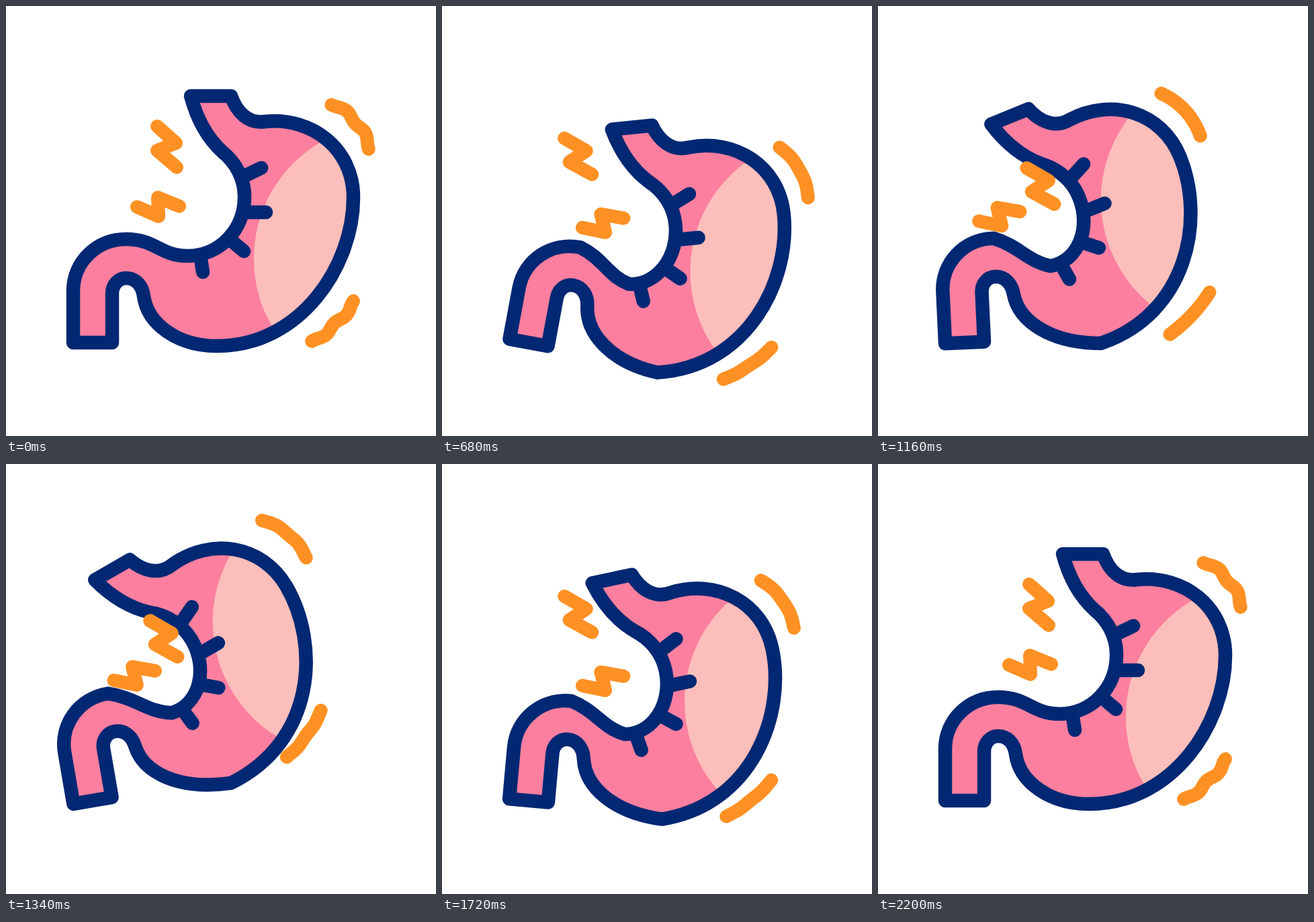
These frames come from a looping animation (640x640 px, 2.4 s). An HTML page:

```html
<!DOCTYPE html>
<html lang="en">
<head>
<meta charset="utf-8">
<title>Stomach ache</title>
<style>
  html, body { margin: 0; width: 100%; height: 100%; overflow: hidden; background: #fff; }
  svg { display: block; width: 100vw; height: 100vh; }
  .line { fill: none; stroke: #022873; stroke-width: 20.5; stroke-linecap: round; stroke-linejoin: round; }
  .pain { stroke: #ff9124; stroke-width: 20; }
</style>
</head>
<body>
<svg viewBox="0 0 640 640">
  <clipPath id="inside"><path id="mask"/></clipPath>
  <path id="fill" fill="#fc7f9f"/>
  <path id="light" fill="#fcbeba" clip-path="url(#inside)"/>
  <path id="wall" class="line"/>
  <path id="folds" class="line"/>
  <path id="waves" class="line pain"/>
  <path id="bolts" class="line pain"/>
</svg>
<script>
const LOOP = 2400, START = 200, END = 2200;

// The drawing at rest.
const BODY = `M275 134 L335 134 C343 157 360 176 386 172 C456 165 517 213 517 285
  C517 385 440 506 314 506 C256 506 211 474 205 432 C203 416 193 405 179 405
  C167 405 158 415 158 428 L158 501 L100 501 L100 424 C100 381 135 347 179 347
  C222 347 230 372 270 372 C318 372 355 333 355 284 C355 257 342 233 322 217
  C298 195 284 168 275 134Z`;
const FOLDS = 'M355 253L380 241 M357 307L387 307 M334 348L354 365 M289 371L293 396';
const LIGHT = 'M476 198 C360 262 343 400 402 486 L650 486 L650 198Z';

const BOLTS = [
  { at: [225, 179], zig: 'M0 0L28 25L0 36L29 61', out: [-43, 18], back: [40, 45] },
  { at: [195, 299], zig: 'M0 0L32 14L31 -14L63 -1', out: [14, 31], back: [-60, -10] }];
const WAVES = [
  { at: [512, 180], angle: 50, bow: 9, push: -15 },
  { at: [486, 469], angle: 136, bow: 4, push: 24 }];

// The leg swings about the foot; the belly turns about its own pivot, which travels.
const FOOT = [129, 501], PIVOT = [387, 307];
const KEYS = [
  { t: START, leg: 0, turn: 0, x: 387, y: 307 },
  { t: 800, leg: 11.7, turn: -6.4, x: 381, y: 349 },
  { t: 1400, leg: -10.4, turn: -30.7, x: 314, y: 264 },
  { t: 1870, leg: 10, turn: -6, x: 386, y: 342 },
  { t: END, leg: 0, turn: 0, x: 387, y: 307 }];

const ramp = (v, a, b) => {
  const u = Math.min(1, Math.max(0, (v - a) / (b - a)));
  return u * u * (3 - 2 * u);
};
const mix = (a, b, u) => a + (b - a) * u;

function poseAt(t) {
  const i = Math.max(1, KEYS.findIndex(k => k.t >= t));
  const [a, b] = [KEYS[i - 1], KEYS[i]];
  const u = ramp(t, a.t, b.t);
  return Object.fromEntries(Object.keys(a).map(n => [n, mix(a[n], b[n], u)]));
}

// Turns a point about one place and sets it down at another.
function spin([x, y], deg, [cx, cy] = [0, 0], [tx, ty] = [cx, cy]) {
  const r = deg * Math.PI / 180, c = Math.cos(r), s = Math.sin(r);
  x -= cx; y -= cy;
  return [tx + x * c - y * s, ty + x * s + y * c];
}

const warp = (path, move) => path.replace(/(-?\d+) (-?\d+)/g,
  (_, x, y) => move([+x, +y]).map(v => v.toFixed(2)).join(' '));

const set = (id, d) => document.getElementById(id).setAttribute('d', d);

function wave({ at, angle, bow, push }, pulse, ripple, move) {
  const points = [];
  for (let k = -1; k <= 1.001; k += 1 / 12) {
    const lift = push * pulse + bow * (1 - k * k) + ripple * Math.sin(Math.PI * k) ** 2;
    points.push(move(spin([43 * k, -lift], angle, [0, 0], at)).map(v => v.toFixed(2)).join(' '));
  }
  return 'M' + points.join('L');
}

function draw(time) {
  const t = Math.min(END, Math.max(START, time));
  const pose = poseAt(t);
  const out = ramp(t, START, 700) - ramp(t, 1700, END);
  const back = ramp(t, 700, 1200) - ramp(t, 1200, 1700);
  const pulse = (1 - Math.cos(2 * Math.PI * (t - START) / 400)) / 2;

  // Skin the outline: leg on the lower left, belly on the right, a soft blend between.
  const leg = p => spin(p, pose.leg, FOOT);
  const skin = p => {
    const belly = spin(p, pose.turn, PIVOT, [pose.x, pose.y]);
    const share = ramp(p[0] - .4 * p[1], 30, 180);
    return leg(p).map((v, i) => mix(v, belly[i], share));
  };
  const body = warp(BODY, skin);
  for (const id of ['mask', 'fill', 'wall']) set(id, body);
  set('folds', warp(FOLDS, skin));
  set('light', warp(LIGHT, skin));

  const ripple = 5 * (1 - pulse) ** 3 * (1 - .4 * out);
  const slide = p => {
    const [x, y] = leg(p);
    return [x - 36 * out, y - 10 * out];
  };
  set('waves', WAVES.map(w => wave(w, pulse, ripple, slide)).join(''));

  set('bolts', BOLTS.map(b => {
    const spot = b.at.map((v, i) => v + b.out[i] * out + b.back[i] * back);
    return warp(b.zig, p => spin(p, -12 * out, [0, 0], spot));
  }).join(''));
}

const start = performance.now();
function tick() {
  draw((performance.now() - start) % LOOP);
  requestAnimationFrame(tick);
}
tick();
</script>
</body>
</html>
```
